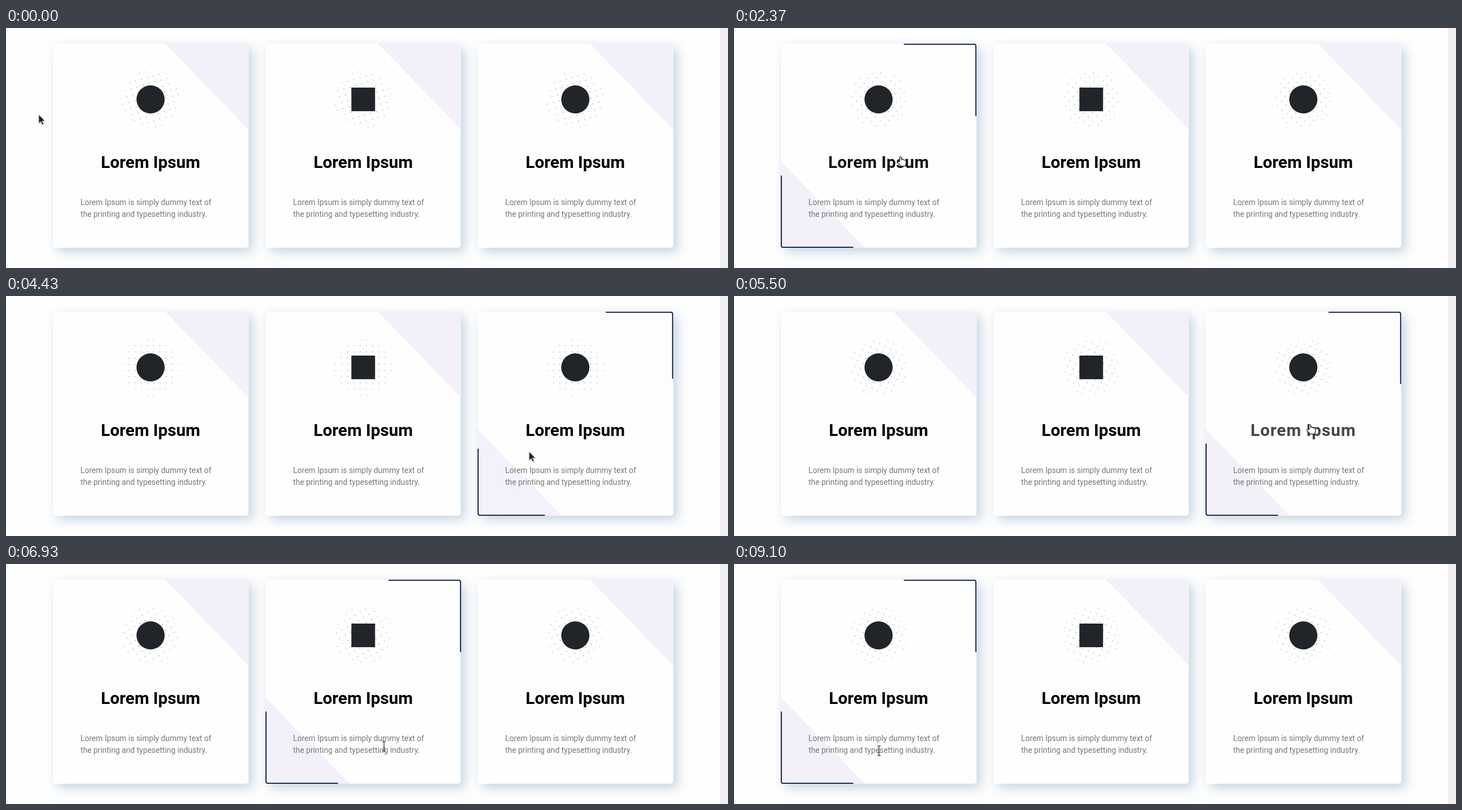
An HTML page that plays this animation: 1280x427 px, repeating every 9130 ms.

```html
<!DOCTYPE html>
<html lang="en">
<head>
<meta charset="utf-8">
<title>Hover cards</title>
<style>
  html, body { margin: 0; width: 100%; height: 100%; overflow: hidden; background: #fefefe; }
  #stage { position: relative; width: 1280px; height: 427px; overflow: hidden; }
  .strip { position: absolute; left: 1266px; top: 0; width: 14px; height: 427px; background: #f1eff2; }
  .card {
    position: absolute; top: 28px; width: 346.67px; height: 363px;
    border-radius: 5px; background: #fefefe;
    box-shadow: 8px 8px 20px rgba(110, 150, 180, .36), 0 0 12px rgba(150, 180, 220, .08);
  }
  .card svg, #cursor { position: absolute; left: 0; top: 0; overflow: visible; }
  .tri { fill: #f3f0fa; }
  .line { fill: none; stroke: #06123a; stroke-width: 1.8; }
  .dots { fill: #a9a9ad; }
  .icon { fill: #212529; }
  .title { font: 700 29.75px Roboto, sans-serif; text-anchor: middle; }
  .copy { font: 13.88px Roboto, sans-serif; fill: #777; }
  .arrow { fill: #222; stroke: #fff; stroke-width: .8; }
  .hand { fill: #fff; stroke: #222; stroke-width: 1.1; stroke-linejoin: round; }
  .beam { fill: none; stroke: #333; stroke-width: 1.1; }
  #cursor { filter: drop-shadow(0 1px 1px rgba(0, 0, 0, .3)); }
</style>
</head>
<body>
<div id="stage"><div class="strip"></div></div>
<script>
const LOOP = 9130, FADE = 300;
const LEFT = 83, PITCH = 376.67, W = 346.67, H = 363;
const CX = 173.3, CY = 99, GAP = 11, DISC = 50;
const START_ANGLE = -16.45, SPIN = 360 / 15000;

const stage = document.getElementById('stage');

// Pointer stops: time, x, y
const path = [
  [0, 58, 155], [300, 45, 153], [1370, 283, 168], [2370, 295, 229], [3500, 593, 304],
  [4700, 1000, 266], [5500, 1021, 229], [6930, 670.5, 324], [7800, 257, 332]
];

const disc = `<circle class="icon" cx="${CX}" cy="${CY}" r="25"/>`;
const square = `<rect class="icon" x="${CX - 21}" y="${CY - 21}" width="42" height="42"/>`;

function dotGrid() {
  let out = '';
  for (let i = -4.5; i < 5; i++) {
    for (let j = -4.5; j < 5; j++) {
      const r = Math.hypot(i, j) * GAP;
      if (r < DISC) out += `<circle cx="${i * GAP}" cy="${j * GAP}" r="${1.15 - r / 120}"/>`;
    }
  }
  return out;
}

const clamp = v => Math.min(1, Math.max(0, v));
const ease = v => v * v * (3 - 2 * v);

function slope(i, k) {
  const a = path[i - 1], b = path[i + 1];
  return a && b ? (b[k] - a[k]) / (b[0] - a[0]) : 0;
}

// Smooth curve through the stops, resting at the last one
function pointer(t) {
  let i = 0;
  while (i < path.length - 2 && t >= path[i + 1][0]) i++;
  const a = path[i], b = path[i + 1], d = b[0] - a[0], u = clamp((t - a[0]) / d);
  return [1, 2].map(k =>
    a[k] + (b[k] - a[k]) * ease(u) +
    d * u * (1 - u) * ((1 - u) * slope(i, k) - u * slope(i + 1, k)));
}

// Hit tests in the coordinates of one card
const onCard = (x, y) => x > 0 && x < W && y > 0 && y < H;
const onTitle = (x, y) => Math.abs(x - CX) < 90 && y > 194 && y < 227;
const onCopy = (x, y) => x > 49 && x < 298 && y > 270 && y < 315;
const hits = (test, i, t) => {
  const [x, y] = pointer(t);
  return test(x - LEFT - i * PITCH, y - 28);
};

// Times at which the pointer enters or leaves an area
function crossings(test, i) {
  const out = [];
  let was = false;
  for (let t = 0; t < LOOP; t += 10) {
    const now = hits(test, i, t);
    if (now !== was) out.push(t);
    was = now;
  }
  return out;
}
const level = (times, t) => times.reduce(
  (sum, at, n) => sum + (n % 2 ? -1 : 1) * ease(clamp((t - at) / FADE)), 0);

const cards = [disc, square, disc].map((icon, i) => {
  const el = document.createElement('div');
  el.className = 'card';
  el.style.left = LEFT + i * PITCH + 'px';
  el.innerHTML = `<svg width="${W}" height="${H}">
    <path class="tri" d="M199.5 0H${W - 5}a5 5 0 0 1 5 5V152.5Z"/>
    <path class="tri" d="M0 209.5V${H - 5}a5 5 0 0 0 5 5H149Z"/>
    <path class="line"/><path class="line"/>
    <g class="dots">${dotGrid()}</g>${icon}
    <text class="title" x="${CX}" y="221">Lorem Ipsum</text>
    <text class="copy" x="49" y="287">Lorem Ipsum is simply dummy text of</text>
    <text class="copy" x="49" y="308">the printing and typesetting industry.</text>
  </svg>`;
  stage.append(el);
  return {
    tris: el.querySelectorAll('.tri'),
    lines: el.querySelectorAll('.line'),
    dots: el.querySelector('.dots'),
    title: el.querySelector('.title'),
    hover: crossings(onCard, i),
    titleHover: crossings(onTitle, i)
  };
});

stage.insertAdjacentHTML('beforeend', `<svg id="cursor" width="24" height="24">
  <path class="arrow" d="M0-1V15L3.7 11.6L6.3 17.3L8.9 16.1L6.4 10.6H11.2Z"/>
  <path class="hand" d="M-1.3 9V1.2Q-1.3-.3 0-.3T1.4 1.2V6Q2-.1 4.3 5.6Q5.5 4.2 7 6.2Q9.6 5.4 9.8 8V11.5L8.4 16.5H.8L-5 10.6Q-5.3 8-3 8.4Z"/>
  <path class="beam" d="M-3-8.5H-1Q0-8.5 0-7.3Q0-8.5 1-8.5H3M0-7.5V7.5M-3 8.5H-1Q0 8.5 0 7.3Q0 8.5 1 8.5H3M-1.5 3H1.5"/>
</svg>`);
const cursor = document.getElementById('cursor');
const shapes = [...cursor.children];

function draw(t) {
  let kind = 0;
  cards.forEach(({ tris, lines, dots, title, hover, titleHover }, i) => {
    const p = level(hover, t), q = level(titleHover, t);
    const len = 128.5 * p, shade = Math.round(70 * q);
    tris[0].style.opacity = 1 - p;
    tris[1].style.opacity = p;
    lines[0].setAttribute('d', `M${W - len} .9H${W - 4}q3.1 0 3.1 3.1V${len}`);
    lines[1].setAttribute('d', `M.9 ${H - len}V${H - 4}q0 3.1 3.1 3.1H${len}`);
    lines.forEach(l => l.style.opacity = p > .05 ? 1 : 0);
    dots.setAttribute('transform', `translate(${CX} ${CY}) rotate(${START_ANGLE + SPIN * t})`);
    title.style.letterSpacing = q + 'px';
    title.style.fill = `rgb(${shade},${shade},${shade})`;
    if (hits(onTitle, i, t)) kind = 1;
    if (hits(onCopy, i, t)) kind = 2;
  });
  const [x, y] = pointer(t);
  cursor.style.transform = `translate(${x}px, ${y}px)`;
  shapes.forEach((s, i) => s.style.display = i === kind ? '' : 'none');
}

const begin = performance.now();
function tick() {
  draw((performance.now() - begin) % LOOP);
  requestAnimationFrame(tick);
}
tick();
</script>
</body>
</html>
```
